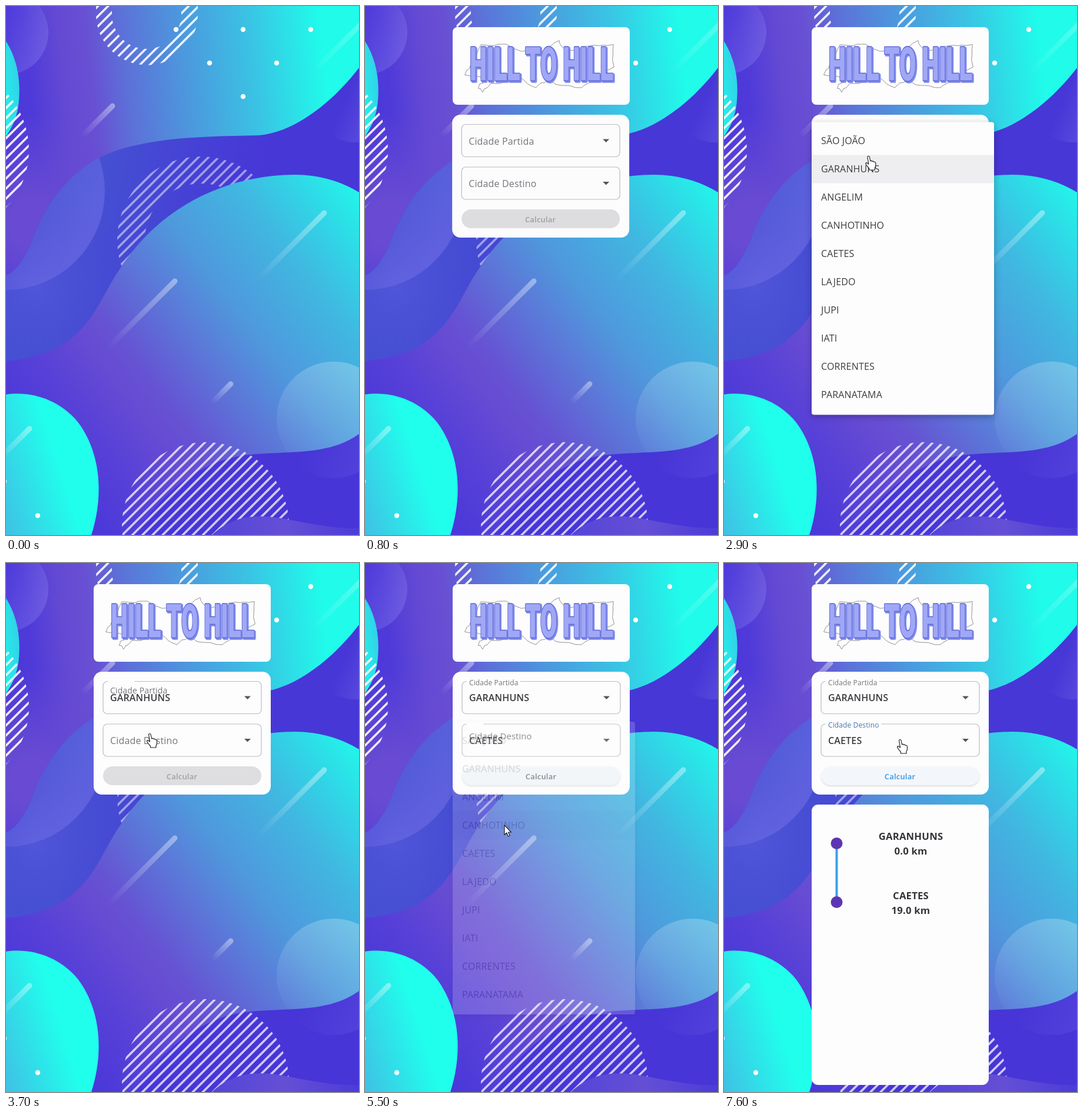
Animation, 600 px wide and 900 px high, one loop 8000 ms. Source, as an HTML page:

```html
<!DOCTYPE html>
<html lang="pt">
<head>
<meta charset="utf-8">
<title>Hill to Hill</title>
<style>
  html, body { margin: 0; width: 100%; height: 100%; overflow: hidden; background: #4a38d8; }
  svg { display: block; width: 600px; height: 900px; }
  text { font: 500 16px "Open Sans", "Noto Sans", sans-serif; letter-spacing: .15px; fill: #3c3c40; }
  #title text { font: 900 41px Roboto, "Liberation Sans", sans-serif; letter-spacing: 0; }
  #title text, .mid { text-anchor: middle; }
  .label { fill: #76767c; }
  .value { font-weight: 600; }
  #result text { font-weight: 700; font-size: 16.7px; letter-spacing: .2px; text-anchor: middle; fill: #333338; }
  #calc { font-weight: 600; font-size: 13px; letter-spacing: .2px; }
  #menu { filter: drop-shadow(0 3px 6px #0004); }
</style>
</head>
<body>
<svg viewBox="0 0 600 900">
  <defs>
    <linearGradient id="top" gradientUnits="userSpaceOnUse" x1="0" y1="150" x2="600" y2="85">
      <stop offset="0" stop-color="#4a37da"/><stop offset=".07" stop-color="#4f3ad9"/>
      <stop offset=".17" stop-color="#644ad3"/><stop offset=".24" stop-color="#684fd3"/>
      <stop offset=".34" stop-color="#5d70d8"/>
      <stop offset=".5" stop-color="#4d96dd"/><stop offset=".7" stop-color="#3ac3e4"/>
      <stop offset=".9" stop-color="#20fbea"/>
    </linearGradient>
    <radialGradient id="topTint" gradientUnits="userSpaceOnUse" cx="45" cy="370" r="190">
      <stop offset=".2" stop-color="#684bd2"/><stop offset="1" stop-color="#684bd2" stop-opacity="0"/>
    </radialGradient>
    <linearGradient id="band" gradientUnits="userSpaceOnUse" x1="150" y1="250" x2="430" y2="310">
      <stop offset="0" stop-color="#4452d2"/><stop offset=".55" stop-color="#4642d5"/>
      <stop offset="1" stop-color="#4737d7"/>
    </linearGradient>
    <radialGradient id="bandTint" gradientUnits="userSpaceOnUse" cx="50" cy="480" r="170">
      <stop offset="0" stop-color="#5056d8"/><stop offset="1" stop-color="#4845d4" stop-opacity="0"/>
    </radialGradient>
    <linearGradient id="big" gradientUnits="userSpaceOnUse" x1="20" y1="755" x2="600" y2="310">
      <stop offset="0" stop-color="#4836da"/><stop offset=".17" stop-color="#5841d7"/>
      <stop offset=".28" stop-color="#664bd3"/><stop offset=".34" stop-color="#6652d3"/>
      <stop offset=".5" stop-color="#5a7dd9"/>
      <stop offset=".6" stop-color="#4f98dc"/><stop offset=".78" stop-color="#40b8e1"/>
      <stop offset=".89" stop-color="#30d6e6"/><stop offset="1" stop-color="#22f6ea"/>
    </linearGradient>
    <linearGradient id="cyan" gradientUnits="userSpaceOnUse" x1="-30" y1="830" x2="95" y2="790">
      <stop offset="0" stop-color="#42bce4"/><stop offset="1" stop-color="#20ffec"/>
    </linearGradient>
    <linearGradient id="edge" x1="0" y1="1" x2="1" y2="0">
      <stop offset="0" stop-color="#20f4ea"/><stop offset="1" stop-color="#38c8e6"/>
    </linearGradient>
    <linearGradient id="foot" x1="0" y1="0" x2="1" y2="0">
      <stop offset="0" stop-color="#5544d8"/><stop offset=".5" stop-color="#644fd5"/><stop offset="1" stop-color="#4c3cd8"/>
    </linearGradient>
    <linearGradient id="disc" x1=".8" y1="0" x2=".2" y2="1">
      <stop offset="0" stop-color="#fff" stop-opacity=".27"/><stop offset="1" stop-color="#fff" stop-opacity="0"/>
    </linearGradient>
    <linearGradient id="discRight" x1=".3" y1=".2" x2="1" y2=".5">
      <stop offset=".2" stop-color="#8a80f0" stop-opacity="0"/><stop offset="1" stop-color="#8a80f0" stop-opacity=".36"/>
    </linearGradient>
    <linearGradient id="tail" x1="1" y1="0" x2="0" y2="1">
      <stop offset="0" stop-color="#fff" stop-opacity=".4"/><stop offset="1" stop-color="#fff" stop-opacity="0"/>
    </linearGradient>
    <pattern id="hatch" width="12.1" height="12.1" patternUnits="userSpaceOnUse" patternTransform="rotate(45)">
      <rect width="3.6" height="12.1" fill="#fff"/>
    </pattern>
    <path id="topShape" d="M0 0H600V105C560 158 495 214 430 220C340 222 235 222 160 257C95 292 62 350 44 400C28 438 12 455 0 458Z"/>
    <path id="bigShape" d="M600 317C568 297 530 287 490 287C365 288 258 348 195 445C152 506 140 592 0 604V900H215C255 850 300 790 385 768C455 752 540 772 600 728Z"/>
    <clipPath id="inBig"><use href="#bigShape"/></clipPath>
    <filter id="soft" x="-10%" y="-40%" width="120%" height="200%"><feGaussianBlur stdDeviation="1.5"/></filter>
  </defs>

  <rect width="600" height="900" fill="#4735d7"/>
  <rect width="600" height="620" fill="url(#band)"/>
  <rect width="600" height="660" fill="url(#bandTint)"/>
  <circle cx="592" cy="170" r="62" fill="url(#discRight)"/>
  <circle cy="315" r="168" fill="url(#discRight)"/>
  <use href="#topShape" fill="url(#top)"/>
  <use href="#topShape" fill="url(#topTint)"/>
  <circle cy="45" r="72" fill="url(#discRight)"/>
  <path d="M0 60C20 92 26 130 21 170C17 195 8 210 0 222Z" fill="url(#edge)"/>
  <path fill-rule="evenodd" fill="url(#hatch)" opacity=".5" d="M189 398a142 142 0 0 1 284 0a142 142 0 0 1 -284 0M236 398a96 96 0 0 0 192 0a96 96 0 0 0 -192 0"/>
  <rect y="640" x="400" width="200" height="260" fill="#4735d7"/>
  <circle cx="557" cy="706" r="97" fill="url(#discRight)" opacity=".5"/>
  <use href="#bigShape" fill="url(#big)"/>
  <circle cx="557" cy="702" r="97" fill="url(#disc)" clip-path="url(#inBig)"/>
  <path d="M0 661C40 655 90 668 123 709C162 762 166 835 145 900H0Z" fill="url(#cyan)"/>
  <circle cx="339" cy="884" r="142" fill="url(#hatch)" opacity=".75"/>
  <path d="M350 900C380 872 415 862 470 872S560 890 600 888V900Z" fill="url(#foot)"/>
  <circle cx="-104" cy="245" r="143" fill="url(#hatch)" opacity=".9"/>
  <path fill-rule="evenodd" fill="url(#hatch)" opacity=".9" d="M153 14a86.500 86.500 0 0 0 173 0V0H298V14a59 59 0 0 1 -118 0V0H153Z"/>
  <g id="decor"></g>

  <g id="logo">
    <rect x="149" y="36" width="301" height="132" rx="8" fill="#fdfdfe"/>
    <path id="outline" fill="none" stroke="#77777c" stroke-width=".8"/>
    <g id="title" transform="translate(300 126) scale(1 1.9)"></g>
  </g>

  <g id="form">
    <rect x="149" y="185" width="301" height="209" rx="14" fill="#fdfdfe"/>
    <g id="fields"></g>
    <rect id="glow" x="165" y="348" width="269" height="32" rx="16" filter="url(#soft)"/>
    <rect id="button" x="165" y="346" width="269" height="32" rx="16"/>
    <text id="calc" class="mid" x="299" y="367.500">Calcular</text>
  </g>

  <g id="result">
    <rect x="149" y="411" width="301" height="477" rx="11" fill="#fdfdfe"/>
    <path d="M191.500 477V577" stroke="#3c9fea" stroke-width="4"/>
    <circle cx="191.500" cy="477" r="10" fill="#5e35b1"/>
    <circle cx="191.500" cy="577" r="10" fill="#5e35b1"/>
    <text x="317.500" y="471">GARANHUNS</text><text x="317.500" y="496">0.0 km</text>
    <text x="317.500" y="572">CAETES</text><text x="317.500" y="596.500">19.0 km</text>
  </g>

  <g id="menu">
    <rect width="310" height="498" rx="4" fill="#fdfdfe"/>
    <rect id="hover" width="310" height="48" fill="#eeeef0"/>
  </g>

  <g id="cursor" stroke="#222" stroke-width="1.200" stroke-linejoin="round" fill="#fff">
    <path id="hand" d="M-1.500 1.500Q0-1 2 1.500L3.500 9Q5 7 6.500 9.500Q8.500 8 9.500 10.500Q12 9.500 12.500 12.500V16Q12.500 18.500 11 20.500V24H1.500V21.500Q-2 18-4.500 13.500Q-4.500 11-2 12L.500 14Z"/>
    <path id="arrow" d="M0 0V16.500L3.800 13L6.300 19L9 17.800L6.500 12H11.500Z"/>
  </g>
</svg>
<script>
const LOOP = 8000, STEP = 100;
const $ = id => document.getElementById(id);
const add = (parent, tag, attrs, text = '') => {
  const el = document.createElementNS('http://www.w3.org/2000/svg', tag);
  for (const k in attrs) el.setAttribute(k, attrs[k]);
  el.textContent = text;
  return parent.appendChild(el);
};
const ramp = (t, a, b) => Math.min(1, Math.max(0, (t - a) / (b - a)));
const easeOut = p => 1 - (1 - p) ** 3;
const mix = (a, b, p) => `rgb(${a.map((v, i) => Math.round(v + (b[i] - v) * p))})`;
const place = (el, x, y, extra = '') => el.setAttribute('transform', `translate(${x} ${y}) ${extra}`);

// Streaks run down-left from their head.
for (const [x, y, len, alpha] of [
  [181, 170, 52, 1], [287, 468, 113, 1], [541, 352, 113, 1],
  [382, 643, 32, 1], [40, 719, 54, 1], [606, 28, 86, .6]
]) add($('decor'), 'path', {
  d: `M${x} ${y}l${-len} ${len}`, stroke: 'url(#tail)', 'stroke-width': 9, 'stroke-linecap': 'round', opacity: alpha
});
for (const [cx, cy] of [[289, 40], [403, 40], [518, 40], [346, 97], [460, 97], [403, 154], [54, 867], [-3, 809]])
  add($('decor'), 'circle', { cx, cy, r: 4.2, fill: '#fff' });

// Loose coastline behind the title.
let seed = 7;
const jitter = () => (seed = seed * 16807 % 2147483647) / 2147483647 * 5 - 2.5;
const coast = [[172, 115], [182, 96], [196, 68], [238, 64], [264, 78], [302, 76], [328, 61], [344, 78], [388, 67],
  [420, 66], [422, 102], [398, 122], [366, 137], [326, 136], [312, 125], [290, 137], [264, 122], [214, 134],
  [198, 145], [192, 137], [206, 124]];
$('outline').setAttribute('d', 'M' + coast.flatMap(([x, y], i) => {
  const [nx, ny] = coast[(i + 1) % coast.length];
  return [0, .25, .5, .75].map(k => `${x + (nx - x) * k + jitter()} ${y + (ny - y) * k + jitter()}`);
}).join('L') + 'Z');

for (const [x, y, fill, stroke, width] of [
  [2, 1, '#7f8bea', '#7f8bea', 3], [0, 0, '#626cd8', '#626cd8', 2.4], [0, 0, '#a0a8f6', '#a0a8f6', .6]
]) add($('title'), 'text', {
  x, y, stroke, 'stroke-width': width, 'stroke-linejoin': 'round', style: `fill:${fill}`
}, 'HILL TO HILL');

const fields = [
  { name: 'Cidade Partida', value: 'GARANHUNS', y: 201.5, gap: 91, open: 2350, close: 3550, pick: 3600 },
  { name: 'Cidade Destino', value: 'CAETES', y: 274, gap: 94, open: 4050, close: 5380, pick: 5440 }
];
for (const f of fields) {
  const g = $('fields');
  add(g, 'rect', { x: 165, y: f.y, width: 269, height: 55, rx: 7, fill: 'none', stroke: '#bcbcc0', 'stroke-width': 1.2 });
  f.notch = add(g, 'rect', { x: 173, y: f.y - 2, height: 4, fill: '#fdfdfe' });
  f.label = add(g, 'text', { class: 'label' }, f.name);
  f.text = add(g, 'text', { class: 'value', x: 177, y: f.y + 33.5 }, f.value);
  add(g, 'path', { d: `M405 ${f.y + 25}h11l-5.500 5.500z`, fill: '#55555a' });
}

['SÃO JOÃO', 'GARANHUNS', 'ANGELIM', 'CANHOTINHO', 'CAETES', 'LAJEDO', 'JUPI', 'IATI', 'CORRENTES', 'PARANATAMA']
  .forEach((city, i) => add($('menu'), 'text', { x: 16, y: 37.5 + i * 48 }, city));

// time, x, y of the pointer tip
const track = [[2100, 245, 222], [2400, 247, 228], [2700, 246, 240], [3300, 244, 285], [3700, 244, 290],
  [4000, 245, 300], [4300, 243, 312], [4900, 239, 480], [5400, 238, 490], [5500, 237, 446],
  [5900, 250, 372], [6200, 252, 366], [7100, 252, 366], [7600, 299, 300]];
function pointer(t) {
  const i = track.findIndex(k => k[0] > t);
  if (i < 1) return track.at(i < 0 ? -1 : 0).slice(1);
  const [t0, x0, y0] = track[i - 1], [t1, x1, y1] = track[i], p = ramp(t, t0, t1);
  return [x0 + (x1 - x0) * p, y0 + (y1 - y0) * p];
}

function slide(el, p, dx, dy, power) {
  place(el, dx * (1 - p), dy * (1 - p));
  el.style.opacity = p ** power;
}

function render(t) {
  slide($('logo'), easeOut(ramp(t, 40, 520)), -302, 0, 1);
  slide($('form'), easeOut(ramp(t, 310, 880)), -302, 0, 2);
  slide($('result'), easeOut(ramp(t, 6280, 6730)), 0, 145, .9);

  const [x, y] = pointer(t);
  place($('cursor'), x, y);
  $('cursor').style.opacity = t < 2100 ? 0 : 1;
  const arrow = t > 5420 && t < 5750;
  $('arrow').style.opacity = arrow ? 1 : 0;
  $('hand').style.opacity = arrow ? 0 : 1;

  $('menu').style.opacity = 0;
  for (const f of fields) {
    const p = ramp(t, f.pick, f.pick + 200);
    place(f.label, 177, f.y + 34 - 28 * p, `scale(${1 - .25 * p})`);
    f.notch.setAttribute('width', f.gap * p);
    f.text.style.opacity = t >= f.pick ? 1 : 0;
    if (t > f.open && t < f.close + 145) {
      const grow = easeOut(ramp(t, f.open, f.open + 250)), top = f.y - 4;
      place($('menu'), 149, top, `scale(${.75 + .25 * grow} ${.56 + .44 * grow})`);
      $('menu').style.opacity = grow * (1 - ramp(t, f.close, f.close + 145));
      const row = Math.max(0, Math.floor((y - top - 8) / 48));
      $('hover').setAttribute('y', 8 + row * 48);
    }
  }
  fields[1].label.style.fill = mix([118, 118, 124], [74, 118, 176], ramp(t, 5500, 5700));

  const on = ramp(t, 5380, 5510);
  const over = ramp(t, 5800, 6000) - ramp(t, 7200, 7450);
  $('button').style.fill = over > 0
    ? mix([243, 247, 251], [207, 229, 251], over)
    : mix([222, 222, 224], [243, 247, 251], on);
  $('glow').style.opacity = on * (.12 + .2 * over);
  $('calc').style.fill = t < 5500
    ? mix([160, 160, 163], [110, 115, 122], on)
    : mix([110, 115, 122], [54, 148, 230], ramp(t, 5500, 5700));
}

const start = performance.now();
function tick(now) {
  const t = Math.max(0, now - start) % LOOP;
  render(Math.floor(t / STEP) * STEP);
  requestAnimationFrame(tick);
}
render(0);
requestAnimationFrame(tick);
</script>
</body>
</html>
```
